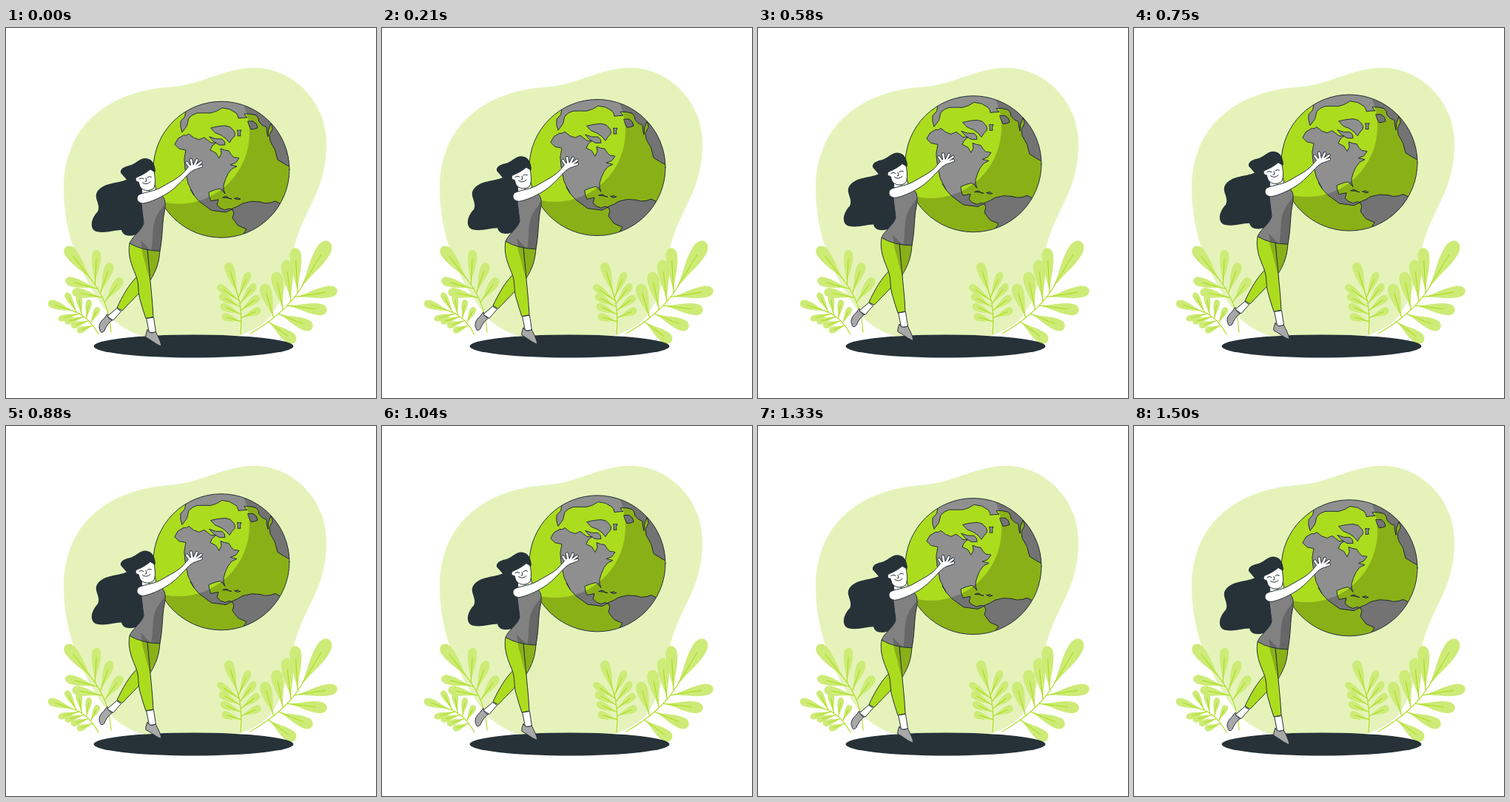
An HTML page for the animation above (1540 ms loop, 500x500 px).

```html
<!DOCTYPE html>
<html lang="en">
<head>
<meta charset="utf-8">
<title>Hugging the planet</title>
<style>
html, body { margin: 0; width: 100%; height: 100%; overflow: hidden; background: #fff; }
svg { display: block; width: 100vw; height: 100vh; }
.ink { stroke: #263238; stroke-width: 1; stroke-linejoin: round; stroke-linecap: round; }
.green { fill: #acdc1e; }
.land { fill: #8f8f8f; }
.shirt { fill: #818181; }
.shoe { fill: #a8a8a8; }
.white { fill: #fff; }
.dark { fill: #263238; }
.line { fill: none; }
.shade { fill: #000; opacity: .2; }
.leaf { fill: #cdeb77; }
.vein { fill: none; stroke: #acdc1e; stroke-width: 1.1; stroke-linecap: round; }
</style>
</head>
<body>
<svg viewBox="0 0 500 500">
  <defs>
    <clipPath id="disc"><circle cx="291" cy="191.3" r="92"/></clipPath>
    <path id="fingers" d="M250 190L244.500 182M252 188L250 178M254 187L258 178.500M255 188L263.500 181.500M254 190L264 186.500"/>
  </defs>

  <path fill="#e5f3bb" d="M224 79.500C262 77 292 56 330 54C386 51 433 99 433 155C434 215 406 240 391 290C381 330 380 360 357 390C337 412 300 425 250 425C200 424 166 415 143 392C108 350 78 285 78 218C78 130 140 85 224 79.500Z"/>
  <g id="plants"></g>
  <ellipse class="dark" cx="253.500" cy="430" rx="135" ry="15.500"/>

  <g id="floating">
    <g clip-path="url(#disc)">
      <circle class="green" cx="291" cy="191.300" r="92"/>
      <g id="lands" class="land ink"></g>
      <path class="shade" fill-rule="evenodd" d="M190 90H390V290H190ZM329 142A95.500 95.500 0 1 0 138 142A95.500 95.500 0 1 0 329 142Z"/>
    </g>
    <circle class="ink line" cx="291" cy="191.300" r="92"/>

    <path class="dark" d="M202 193C201 184 198 177 189 176C179 176 176 184 166 186C156 188 152 194 157 198L163 205C150 210 134 209 125 219C116 229 129 237 124 248C114 258 113 272 122 275C135 278 145 273 156 273C158 281 166 282 175 279.500C184 277 189 268 189 262L190 222Z"/>

    <path class="green ink" d="M208 301C207 317 203 328 195 341C184 355 172 366 157 382L150 378C157 363 166 346 179 334L184 292Z"/>
    <path class="shade" d="M184 292L208 301C207 317 203 328 194 341L182 356L177 336Z"/>
    <path class="green ink" d="M167 291C164 307 170 321 175 333C181 347 177 355 182 370Q185 381 189 392.500L199 390.500C198 368 195 345 193.500 325L191 299Z"/>
    <path class="shade" d="M183 290L192 298L194 340L190 326C188 313 182 304 183 290Z"/>
    <path class="white ink" d="M150 379L155.500 383Q150 389 145 395L137 390ZM190 392.500L199.500 391L202.500 411L194 412Z"/>
    <path class="shoe ink" d="M137 387C137 391 140 394 143.500 395C138 399 135 404 133 409C130 413 127 411 127 408C124 403 128 396 132 393ZM191 408C194 414 200 412 202 410C205 416 209 423 210 430C203 428 197 422 189 418Q188 415 191 408Z"/>

    <path class="white ink" d="M183 213L184 226L195 224L192 217Z"/>
    <path class="shirt ink" d="M183 236L210 226C216 231 216 238 214 249C211 262 212 281 208 301.500Q184 301 167 291C170 282 184 273 186 264Z"/>
    <path class="shade" d="M215 235C214 241 207 246 203 255C196 270 200 283 196 301L208 301.500C212 281 211 262 214 249ZM182 287L196 301L184 298Z"/>

    <path class="white ink" d="M178 201C184 199 190 195 195 191L200 194C202 203 202 211 200 216C194 222 184 220 181 214L179 208C174 208 174 202 178 201Z"/>
    <path class="ink line" d="M180 204Q183 201.500 186 204M191 202Q194 199.500 196.500 201.500M189 203L190 207 188 207.500M184.500 209Q190 213 195 208"/>

    <use href="#fingers" fill="none" stroke="#263238" stroke-width="4.400" stroke-linecap="round"/>
    <path class="white ink" d="M180 225C190 221 201 221 212 214C224 207 235 202 242 193L248 186C252 183 256 186 256 189C254 193 251 193 248 196C238 206 229 217 217 224C207 230 196 235 186 237C176 237 175 228 180 225Z"/>
    <use href="#fingers" fill="none" stroke="#fff" stroke-width="2.600" stroke-linecap="round"/>
  </g>
</svg>
<script>
const LOOP = 1540, RISE = 10, LOWEST_AT = 1500;
const byId = id => document.getElementById(id);

let seed = 7;
const random = () => (seed = seed * 16807 % 2147483647) / 2147483647;

// Joins a few key points, bending each side a little like a coast.
function coast(text) {
  const points = text.split(' ').map(pair => pair.split(',').map(Number));
  const bent = points.flatMap(([x, y], i) => {
    const [nextX, nextY] = points[(i + 1) % points.length];
    const bend = (random() - .5) * .35;
    return [[x, y], [(x + nextX) / 2 + (nextY - y) * bend, (y + nextY) / 2 - (nextX - x) * bend]];
  });
  return `<path d="M${bent.join(' ')}Z"/>`;
}

byId('lands').innerHTML = [
  // Northern rim, Europe and Africa
  '225,75 243,112 236,126 238,141 247,122 258,115 276,115 292,108 311,115 314,122 326,121 322,116 338,118 342,127 352,134 354,147 358,129 360,137 357,153 367,178 384,188 425,188 425,75',
  '327,126 334,126 340,135 331,137',
  // Arctic islands
  '277,135 296,132 308,139 309,146 302,155 291,145',
  '313,138 318,138 317,146 313,146',
  '275,147 292,150 296,158 288,158',
  // North and Central America
  '228,157 240,145 247,143 261,151 268,148 277,155 284,155 276,165 288,176 290,163 301,166 308,175 315,176 303,185 312,187 300,197 294,213 296,224 289,217 274,222 277,234 287,232 285,239 296,246 306,245 297,249 262,235 249,218 254,226 246,210 242,190 243,165',
  // South America
  '306,244 320,237 343,235 358,236 364,234 380,240 360,300 320,285 325,272 306,257',
  // Caribbean
  '293,229 299,228 305,231',
  '309,230 313,229 317,231'
].map(coast).join('');

function leaf(x, y, angle, len, width) {
  const w = width / 2, a = len * .35, b = len * .5, c = len * .8, d = len * 1.07;
  return `<g transform="translate(${x} ${y}) rotate(${angle})">
    <path class="leaf" d="M0 0C${a} ${-w * .3} ${b} ${-w} ${c} ${-w}C${d} ${-w} ${d} ${w} ${c} ${w}C${b} ${w} ${a} ${w * .3} 0 0Z"/>
    <path class="vein" d="M0 0H${len * .72}"/></g>`;
}

// A curved stem with one leaf at its end and others alternating down its sides.
function plant({ root, bend, end, count, len, width, side = 1 }) {
  const at = t => [0, 1].map(k => (1 - t) ** 2 * root[k] + 2 * t * (1 - t) * bend[k] + t * t * end[k]);
  const heading = t => {
    const [dx, dy] = [0, 1].map(k => (1 - t) * (bend[k] - root[k]) + t * (end[k] - bend[k]));
    return Math.atan2(dy, dx) * 180 / Math.PI;
  };
  let shapes = leaf(...end, heading(1), len, width);
  for (let i = 0; i < count; i++) {
    const t = 1 - .09 * (i + 1);
    const turn = (i % 2 ? -side : side) * (38 + 5 * i);
    shapes += leaf(...at(t), heading(t) + turn, len * (.82 - .03 * i), width * .78);
  }
  return shapes + `<path class="vein" d="M${root}Q${bend} ${end}"/>`;
}

byId('plants').innerHTML = [
  { root: [142, 411], bend: [140, 372], end: [116, 341], count: 5, len: 57, width: 16 },
  { root: [125, 414], bend: [112, 390], end: [92, 383], count: 8, len: 37, width: 11 },
  { root: [317, 414], bend: [320, 382], end: [313, 360], count: 8, len: 45, width: 13 },
  { root: [330, 413], bend: [378, 385], end: [398, 352], count: 8, len: 74, width: 20, side: -1 }
].map(plant).join('');

const floating = byId('floating');
const start = performance.now();

function draw(now) {
  const phase = (Math.max(0, now - start) + LOOP - LOWEST_AT) / LOOP % 1;
  const lift = RISE * (1 - Math.abs(2 * phase - 1));
  floating.setAttribute('transform', `translate(0 ${.5 - lift})`);
  requestAnimationFrame(draw);
}
draw(start);
</script>
</body>
</html>
```
